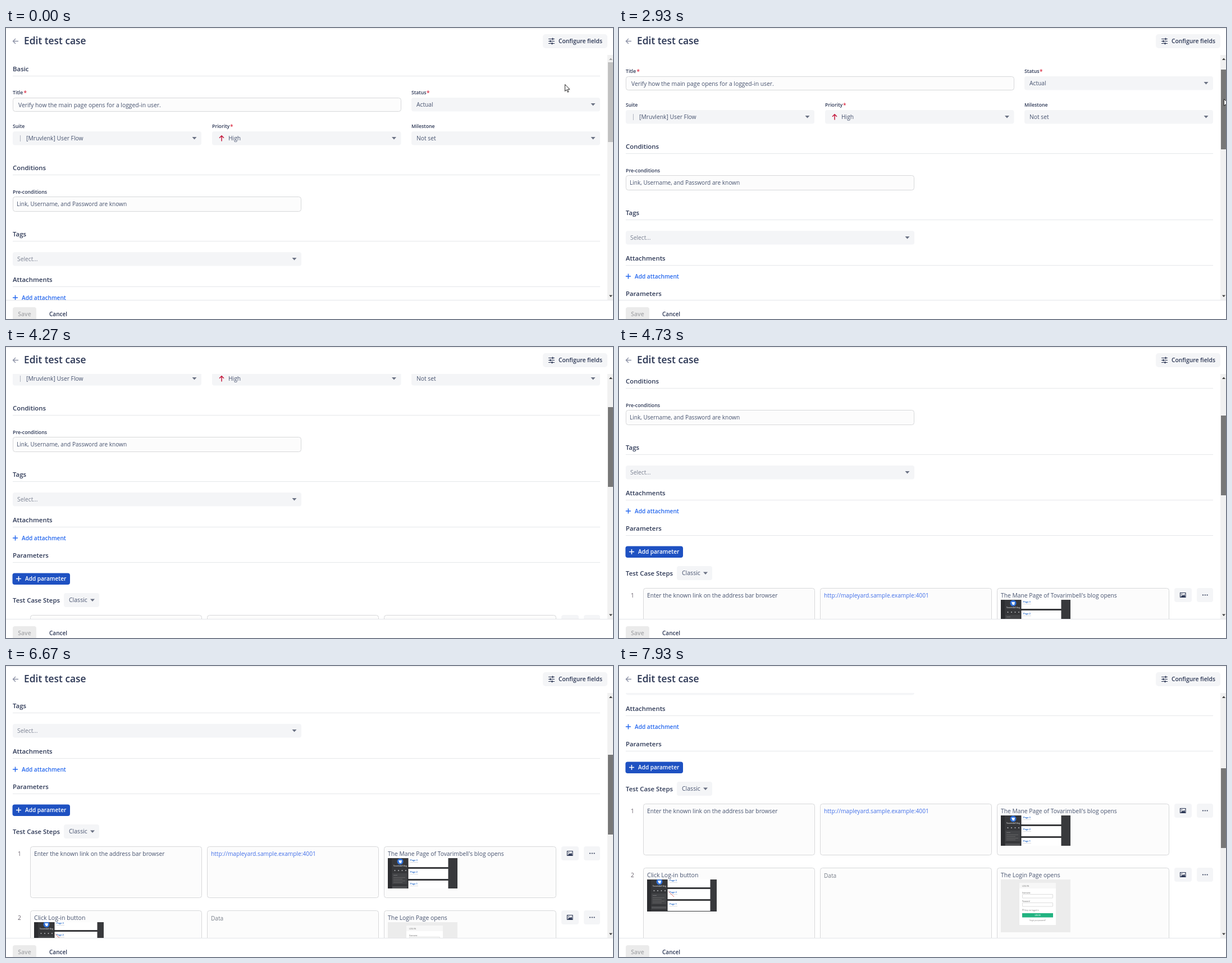
An HTML page for the animation above (8000 ms loop, 1081 px wide and 518 px high).

```html
<!DOCTYPE html>
<html lang="en">
<head>
<meta charset="utf-8">
<title>Edit test case</title>
<style>
html, body { margin: 0; width: 100%; height: 100%; overflow: hidden; background: #fff; }
svg { display: block; }
text { font-family: "Open Sans", "Noto Sans", sans-serif; white-space: pre; }
</style>
</head>
<body>
<svg id="stage" width="1081" height="518" viewBox="0 0 1081 518"></svg>
<script>
const INK = '#2b3654', BODY = '#47536f', PALE = '#f4f5f7', BLUE = '#2467ee';

const text = (x, y, s, size = 10.3, fill = BODY, weight = 400, anchor = 'start') =>
  `<text x="${x}" y="${y}" font-size="${size}" fill="${fill}" font-weight="${weight}" text-anchor="${anchor}">${s}</text>`;
const rect = (x, y, w, h, fill, r = 0, stroke = 'none') =>
  `<rect x="${x}" y="${y}" width="${w}" height="${h}" rx="${r}" fill="${fill}" stroke="${stroke}"/>`;
const line = (d, color, width = 1.3) =>
  `<path d="${d}" fill="none" stroke="${color}" stroke-width="${width}"/>`;
const shape = (d, fill) => `<path d="${d}" fill="${fill}"/>`;
const dot = (x, y, r, fill) => `<circle cx="${x}" cy="${y}" r="${r}" fill="${fill}"/>`;

const caret = (x, y) => shape(`M${x - 4} ${y - 2.5}h8l-4 4.5z`, '#6b7284');
const plus = (x, y, color) => line(`M${x - 4.5} ${y}h9M${x} ${y - 4.5}v9`, color, 1.5);
const heading = (y, s) => text(12, y, s, 11.4, INK, 600);
const section = (y, s) => heading(y, s) + rect(12, y + 8, 1046, 1, '#e5e7ea');
const label = (x, y, s, starX) => text(x, y, s, 8.75, INK, 600) +
  (starX ? text(starX, y + 1, '*', 10, '#dc2f45', 600) : '');
const field = (x, y, w, h) => rect(x + .5, y + .5, w - 1, h - 1, '#fcfcfc', 4, '#d7d8da');
const select = (x, y, w, s, textX, color) =>
  rect(x, y, w, 24.5, PALE, 4) + text(textX, y + 16, s, 10.3, color) + caret(x + w - 12.5, y + 12.5);

// Small picture of the blog page; shift moves its content vertically
function blogThumb(id, x, y, h, shift, cardW) {
  let s = rect(0, 0, 124, h, '#38393c') + rect(0, 0, 37, h, '#2c2d30') + rect(7, 0, 28, h, '#36373a');
  s += dot(22, 6 + shift, 5.5, '#2f70d8') + shape(`M19 ${4 + shift}h6l-1 5h-3z`, '#fff');
  s += text(22, 15 + shift, 'Tovarimbell blog', 3, '#ddd', 600, 'middle');
  for (let i = 0; i < 4; i++) s += dot(12.5 + i * 6.5, 22 + shift, .9, '#c5c7ca');
  s += rect(8, 27 + shift, 26, 19, '#434447') + text(10, 31 + shift, 'About', 2.5, '#ddd');
  for (let i = 0; i < 4; i++) s += rect(10, 34 + shift + i * 3, 21 - i % 2 * 5, .6, '#777');
  s += rect(8, 50 + shift, 26, 4, '#505154');
  for (let i = 0; i < 3; i++) {
    const top = i * 21 - 2 + shift;
    s += rect(36.5, top, cardW, 18, '#fff') +
      text(40, top + 7, 'Page ' + (3 - i), 4, '#2d6fcb', 700) +
      rect(40, top + 9, 14, .6, '#c3c6cb');
  }
  return `<clipPath id="${id}"><rect width="124" height="${h}"/></clipPath>` +
    `<g transform="translate(${x} ${y})" clip-path="url(#${id})">${s}</g>`;
}

function loginThumb(x, y) {
  const s = rect(0, 0, 124, 94, '#ececec') + rect(33, 6, 65, 75, '#fff') + rect(33, 6, 65, 10, '#f7f7f7') +
    text(38, 12.5, 'LOG IN', 3.6, '#666') +
    text(38, 25, 'Username', 3, '#555') + rect(38.5, 26.5, 54, 6.5, '#fff', .5, '#ddd') +
    text(38, 40, 'Password', 3, '#555') + rect(38.5, 41.5, 54, 6.5, '#fff', .5, '#ddd') +
    rect(38.5, 53, 2, 2, '#fff', 0, '#ccc') + text(42, 55.5, 'Keep me logged in', 3, '#777') +
    rect(38, 60, 55, 7.5, '#22b381') + text(65.5, 65, 'LOG IN', 3, '#fff', 600, 'middle') +
    text(65.5, 74, 'Forgot your password?', 2.7, '#777', 400, 'middle');
  return `<g transform="translate(${x} ${y})">${s}</g>`;
}

function step(n, y, h) {
  return text(24, y + 17, n, 10.3, '#68606c', 400, 'middle') +
    [[43, 306], [358, 306], [673, 307]].map(([x, w]) => field(x, y, w, h)).join('') +
    rect(989, y, 31, 25, PALE, 4) + rect(1029, y, 29, 25, PALE, 4) +
    line(`M999.5 ${y + 8.5}h9.5v8h-9.5z`, INK, 1.2) +
    shape(`M1000.5 ${y + 16}l2.5-4 1.5 2 2-3 2 5z`, INK) + dot(1002.3, y + 10.8, .9, INK) +
    [1040, 1043.8, 1047.6].map(x => dot(x, y + 12.5, 1.1, INK)).join('');
}

const content =
  section(77, 'Basic') +
  label(12, 118, 'Title', 31.5) + field(12, 124, 692, 25) +
  text(22, 141, 'Verify how the main page opens for a logged-in user.', 10.35) +
  label(722, 118, 'Status', 749) + select(722, 124, 336, 'Actual', 731) +
  label(12, 178, 'Suite') + select(12, 184, 336, '[Mruvlenk] User Flow', 36) + rect(25, 191, 1, 11, '#b0b5c0') +
  label(367, 178, 'Priority', 399) + select(367, 184, 336.5, 'High', 396) +
  line('M384 201.5v-9.5M380 195.8l4-4 4 4', '#c4183c', 1.5) +
  label(722, 178, 'Milestone') + select(722, 184, 336, 'Not set', 731) +
  section(253, 'Conditions') +
  label(12, 295, 'Pre-conditions') + field(12, 300, 514, 27) +
  text(19, 317, 'Link, Username, and Password are known', 10.1) +
  section(371, 'Tags') + select(12, 399, 514, 'Select...', 20, '#7a8192') +
  section(452, 'Attachments') +
  plus(16.5, 480, BLUE) + text(28, 484, 'Add attachment', 10.1, BLUE, 600) +
  section(515, 'Parameters') +
  rect(11.5, 542.5, 102.5, 20.5, '#1e51c2', 4) + plus(22.5, 552.5, '#fff') +
  text(34, 556, 'Add parameter', 10.05, '#fff', 600) +
  heading(595, 'Test Case Steps') + rect(103, 578, 63, 25, PALE, 4) +
  text(112, 594, 'Classic', 10.5) + caret(154, 591) +
  step(1, 617, 92) + text(50, 634, 'Enter the known link on the address bar browser', 10.25) +
  text(365, 634, 'http://mapleyard.sample.example:4001', 10.2, '#426fe8') +
  text(680, 634, 'The Mane Page of Tovarimbell\'s blog opens') +
  blogThumb('open', 680, 638, 54, 0, 71) +
  step(2, 731, 140) + text(50, 748, 'Click Log-in button', 10.55) +
  blogThumb('click', 50, 752, 57, -2, 76) + line('M88 773l10 10', '#e2574f', .8) +
  text(365, 749, 'Data', 10.1, '#777d88') +
  text(680, 748, 'The Login Page opens', 10.4) + loginThumb(680, 752);

const header =
  rect(0, 0, 1081, 48, '#fff') + rect(0, 0, 1081, 2, '#f4f4f5') +
  line('M22 23.5H12.5M17 19l-4.5 4.5 4.5 4.5', '#8d92a6', 1.4) +
  text(32, 29, 'Edit test case', 17.4, INK, 600) +
  rect(956, 11, 115, 25, PALE, 5) +
  line('M966 19.5h11M966 23.5h11M966 27.5h11', INK, 1.1) +
  line('M973.5 17.8v3.4M969.5 21.8v3.4M972.5 25.8v3.4', INK, 1.8) +
  text(984, 27, 'Configure fields', 10.3, INK, 600);

const footer =
  rect(0, 484, 1081, 34, '#fff') + rect(0, 484, 1081, 1, '#e4e6e9') +
  rect(12, 497, 42, 25, '#ebebeb', 4) + text(33, 513, 'Save', 10.4, '#a6a7aa', 600, 'middle') +
  text(77, 513, 'Cancel', 10, INK, 600);

const scrollbar =
  rect(1071, 48, 10, 436, '#f1f1f1') +
  '<path id="up" d="M1074 57h6l-3-3.5z"/>' + shape('M1074 475.5h6l-3 3.5z', '#404040') +
  '<rect id="thumb" x="1072" width="9" height="142"/>';

const cursor = '<path id="cursor" d="M.5.5v12l2.8-2.6 2 4.4 1.8-.8-2-4.3h3.9z" fill="#fff" stroke="#111" stroke-width=".9"/>';

const $ = id => document.getElementById(id);
$('stage').innerHTML = `<g id="page">${content}</g>${header}${footer}${scrollbar}${cursor}`;

// Scroll drag: [tick, offset], at 15 ticks per second
const DRAG = [[28, 0], [30, 5], [35, 5], [38, 14], [40, 14], [44, 38], [53, 90], [54, 90], [57, 102],
  [59, 102], [64, 140], [71, 188], [75, 188], [77, 197], [79, 197], [83, 223], [92, 272], [93, 272],
  [95, 281], [98, 281], [100, 296], [110, 352], [112, 352], [114, 362], [118, 362], [119, 372]];

function offsetAt(tick) {
  const i = DRAG.findIndex(k => k[0] >= tick);
  if (i <= 0) return 0;
  const [t0, a] = DRAG[i - 1], [t1, b] = DRAG[i];
  return Math.round(a + (b - a) * (tick - t0) / (t1 - t0));
}

function draw(now) {
  const tick = Math.min(119, Math.floor((now % 8000 + 4) * 15 / 1000));
  const offset = offsetAt(tick), held = tick > 28;
  const p = Math.min(1, tick / 6), reach = p * p * (3 - 2 * p);
  const x = 995 + 81 * reach + offset * .035, y = 100 + 14 * reach + offset * .325;
  $('page').setAttribute('transform', `translate(0 ${-offset})`);
  $('thumb').setAttribute('y', Math.round(61.3 + offset * .325));
  $('thumb').setAttribute('fill', held ? '#787878' : '#c1c1c1');
  $('up').setAttribute('fill', held ? '#404040' : '#a3a3a3');
  $('cursor').setAttribute('transform', `translate(${Math.round(x)} ${Math.round(y)})`);
  requestAnimationFrame(draw);
}
requestAnimationFrame(draw);
</script>
</body>
</html>
```
